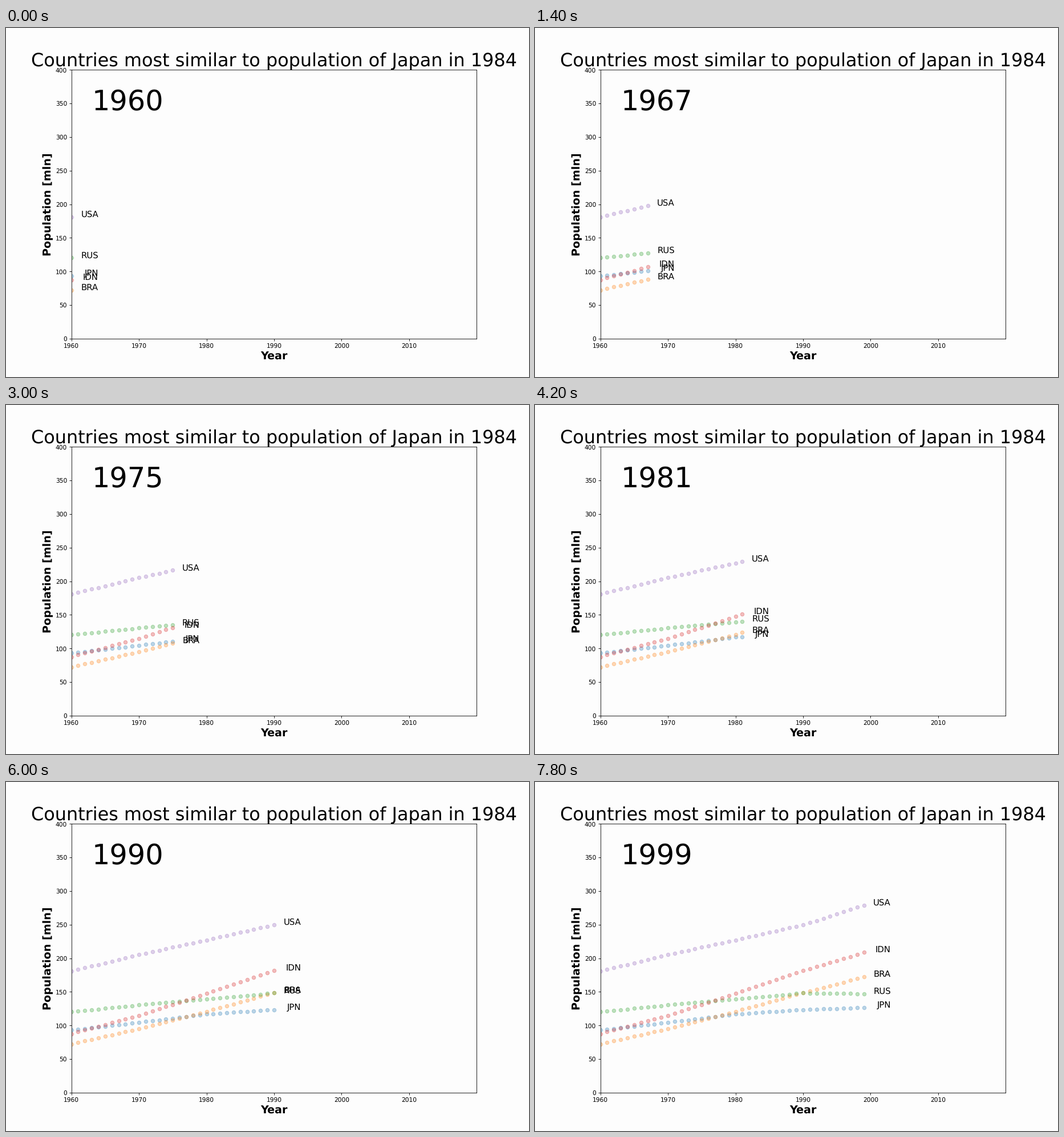
Recreate the animation shown at these times as a matplotlib script. Size 917 by 611 pixels, loop 8 s.

```python
import numpy as np
import matplotlib.pyplot as plt
from matplotlib.animation import FuncAnimation

W, H, DPI = 917, 611, 76.4
START, FRAMES, INTERVAL = 1960, 40, 200
BACK = "#fdfdfd"

plt.rcParams["font.family"] = "DejaVu Sans"
plt.rcParams["text.hinting"] = "no_hinting"

# Population in millions at the key years; straight growth in between.
KEY_YEARS = [1960, 1970, 1980, 1990, 1999]
COUNTRIES = {
    "JPN": ("tab:blue", [93, 104.5, 116.8, 123.5, 126.6]),
    "BRA": ("tab:orange", [72.2, 95.1, 120.7, 149, 172]),
    "RUS": ("tab:green", [120.2, 130.4, 139, 148.3, 147.2]),
    "IDN": ("tab:red", [87.8, 114.8, 147.5, 181.4, 208.6]),
    "USA": ("tab:purple", [181, 205.2, 227.2, 249.6, 279]),
}

# The small margin keeps the size from rounding down a pixel.
fig, ax = plt.subplots(figsize=((W + 0.01) / DPI, (H + 0.01) / DPI),
                       dpi=DPI, facecolor=BACK)
ax.set_facecolor(BACK)
ax.set_xlim(START, 2020)
ax.set_ylim(0, 400)
ax.set_xticks(range(START, 2020, 10))
ax.set_title("Countries most similar to population of Japan in 1984",
             fontsize=30)
ax.set_xlabel("Year", fontsize=18, fontweight="bold")
ax.set_ylabel("Population [mln]", fontsize=18, fontweight="bold")

years = START + np.arange(FRAMES)
counter = ax.text(1963, 340, "", fontsize=46.5)

series = []
for code, (colour, values) in COUNTRIES.items():
    people = np.interp(years, KEY_YEARS, values)
    dots = ax.scatter([], [], color=colour, alpha=0.3)
    label = ax.text(START, 0, code, fontsize=14, ha="right")
    series.append((people, dots, label))


def draw(i):
    counter.set_text(str(years[i]))
    for people, dots, label in series:
        dots.set_offsets(np.column_stack((years, people))[:i + 1])
        label.set_position((years[i] + 4, people[i]))
    return []


anim = FuncAnimation(fig, draw, frames=FRAMES, interval=INTERVAL,
                     repeat=True, repeat_delay=0)
plt.show()
```
